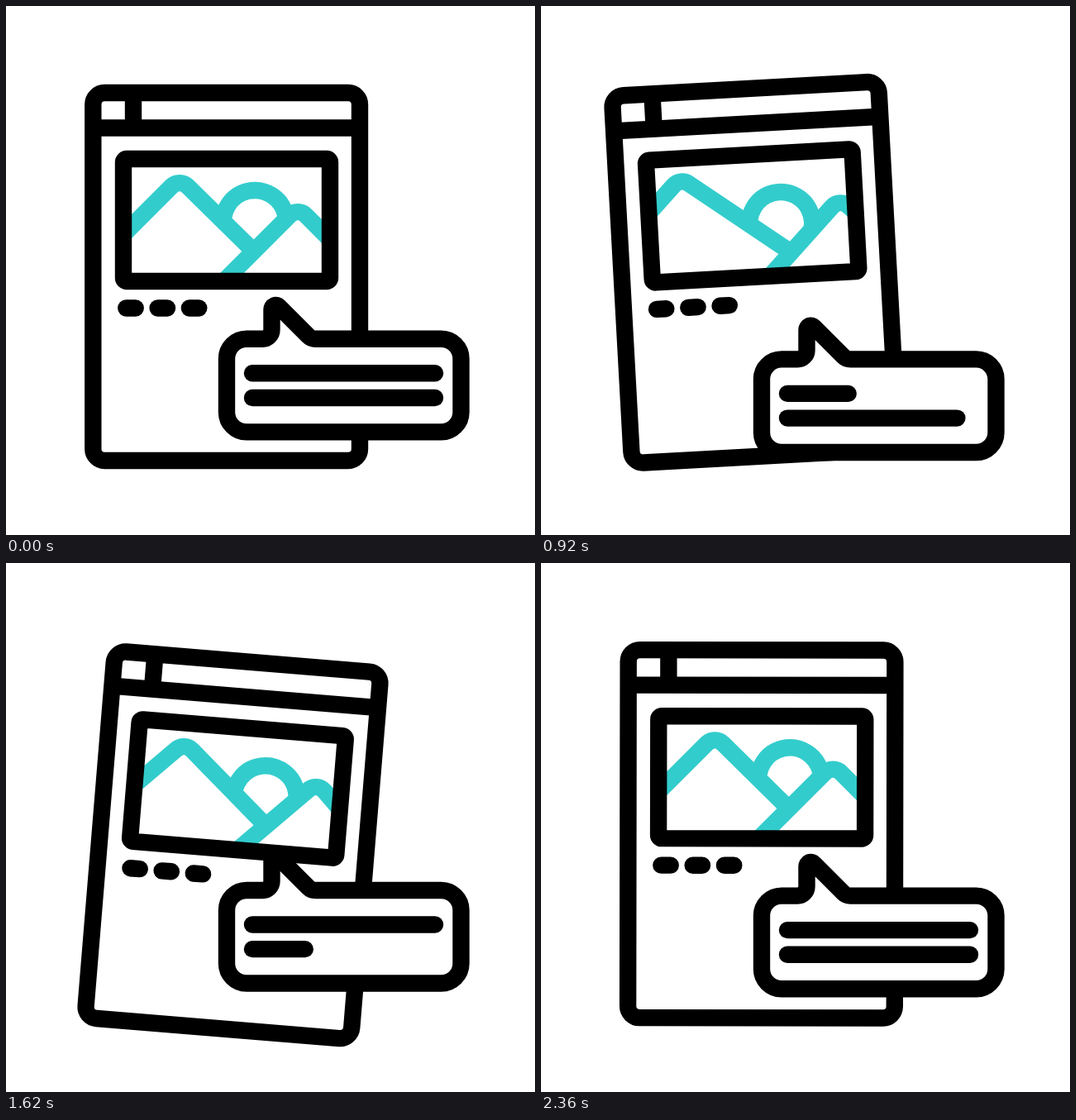
Write an HTML page with a canvas that moves like this. It is 640x640 px and loops after 2.4 s.

```html
<!DOCTYPE html>
<html lang="en">
<head>
<meta charset="utf-8">
<title>Page with comment</title>
<style>
  html, body { margin: 0; width: 100%; height: 100%; overflow: hidden; background: #fff; }
  canvas { display: block; width: 640px; height: 640px; }
</style>
</head>
<body>
<canvas id="stage" width="640" height="640"></canvas>
<script>
const LOOP = 2400;
const INK = '#000', TEAL = '#33cccc', PAPER = '#fff';
const PIVOT = [128, 441.5];
const ctx = document.getElementById('stage').getContext('2d');

const linear = x => x;
const smooth = x => x * x * (3 - 2 * x);
const easeIn = x => x ** 1.75;
const easeOut = x => 1 - (1 - x) ** 1.5;

// Starts at zero, then runs through legs of [end time, end value, ease].
function motion(begin, ...legs) {
  return t => {
    let from = begin, value = 0;
    for (const [to, target, ease] of legs) {
      if (t < to) {
        const x = Math.max(0, (t - from) / (to - from));
        return value + (target - value) * ease(x);
      }
      from = to;
      value = target;
    }
    return value;
  };
}

const tilt = motion(80, [740, -5.15, smooth], [1710, 5.7, linear], [LOOP, 0, easeOut]);
const bob = motion(0, [1060, 31.5, easeIn], [1710, -13, linear], [LOOP, 0, easeOut]);
const trim = motion(0, [1080, 195, easeIn], [1590, 0, linear]);
const sunDrop = motion(0, [1360, 11, easeOut], [1880, 0, smooth]);
const slide = (near, far) =>
  motion(0, [340, near, easeOut], [1280, far, easeOut], [1880, 0, smooth]);
const leftPeak = slide(-21, -29.5);
const rightPeak = slide(15, 22.5);

function outline(color, build, fill) {
  ctx.beginPath();
  build();
  if (fill) ctx.fill();
  ctx.strokeStyle = color;
  ctx.stroke();
}

function box(x, y, w, h, r, fill) {
  outline(INK, () => ctx.roundRect(x, y, w, h, r), fill);
}

function line(x1, y1, x2, y2, cap = 'butt') {
  ctx.lineCap = cap;
  outline(INK, () => { ctx.moveTo(x1, y1); ctx.lineTo(x2, y2); });
  ctx.lineCap = 'butt';
}

// A rounded peak: the left side falls at 45 degrees, the right by `fall`.
function mountain(x, y, fall) {
  const reach = 160;
  outline(TEAL, () => {
    ctx.moveTo(x - reach, y + reach);
    ctx.arcTo(x, y, x + reach, y + reach * fall, 14);
    ctx.lineTo(x + reach, y + reach * fall);
  }, true);
}

function drawPicture(t) {
  const frame = [142, 185, 250, 148];
  ctx.save();
  ctx.beginPath();
  ctx.rect(...frame);
  ctx.clip();

  outline(TEAL, () => ctx.arc(301, 261 + sunDrop(t), 38, Math.PI - 0.22, 0.22));

  // The left mountain's far slope always passes through the valley.
  const x = 210 + leftPeak(t), y = 208.5;
  mountain(x, y, (297 - y) / (300 - x));
  mountain(353 + rightPeak(t), 243.5, 1);
  ctx.restore();

  box(...frame, 4);
}

function drawPage(t) {
  const drift = Math.sin(Math.PI * t / LOOP);
  ctx.save();
  ctx.translate(PIVOT[0] - 1.2 * drift, PIVOT[1] + 2.4 * drift);
  ctx.rotate(tilt(t) * Math.PI / 180);
  ctx.translate(-PIVOT[0], -PIVOT[1]);

  box(105.3, 105, 322.7, 445, 14, true);
  line(105, 147.5, 428, 147.5);
  line(154, 105, 154, 147);
  drawPicture(t);
  for (let i = 0; i < 3; i++) {
    const x = 145.3 + 38.3 * i;
    line(x, 365.5, x + 11.4, 365.5, 'round');
  }
  ctx.restore();
}

function drawBubble(t) {
  const left = 267, right = 550.5, top = 402.8, bottom = 515.4;
  const tailX = 321.5, tailY = 355, tailEnd = tailX + top - tailY;
  ctx.save();
  ctx.translate(0, bob(t));
  outline(INK, () => {
    ctx.moveTo(290, top);
    ctx.arcTo(tailX, top, tailX, tailY, 11);
    ctx.arcTo(tailX, tailY, tailEnd, top, 5);
    ctx.arcTo(tailEnd, top, 400, top, 12);
    ctx.arcTo(right, top, right, bottom, 24);
    ctx.arcTo(right, bottom, left, bottom, 24);
    ctx.arcTo(left, bottom, left, top, 24);
    ctx.arcTo(left, top, 290, top, 24);
    ctx.closePath();
  }, true);
  line(298, 444.3, 519 - trim(t), 444.3, 'round');
  line(298, 474, 519 - trim(t - 665), 474, 'round');
  ctx.restore();
}

function draw(now) {
  const t = now % LOOP;
  ctx.fillStyle = PAPER;
  ctx.fillRect(0, 0, 640, 640);
  ctx.lineWidth = 20.4;
  drawPage(t);
  drawBubble(t);
}

let start;
function tick(now) {
  start ??= now;
  draw(Math.max(0, now - start));
  requestAnimationFrame(tick);
}
draw(0);
requestAnimationFrame(tick);
</script>
</body>
</html>
```
